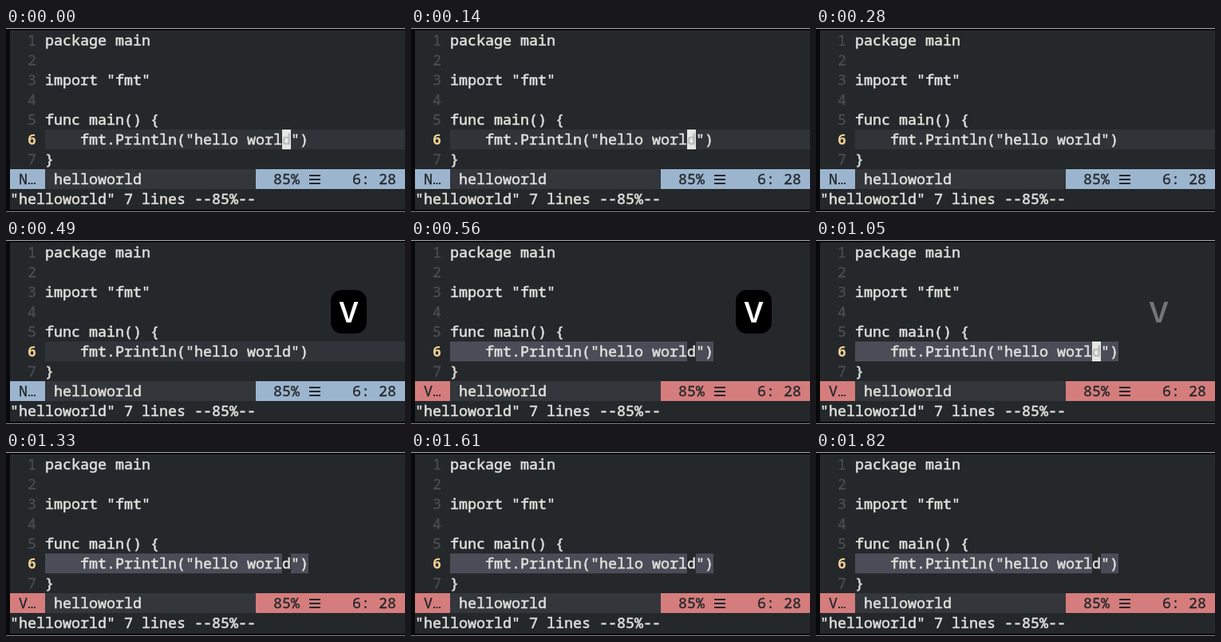
An HTML page that plays this animation: 500x232 px, repeating every 1.89 s.

```html
<!DOCTYPE html>
<html lang="en">
<head>
<meta charset="utf-8">
<title>Editor: selecting a line</title>
<style>
  html, body { margin: 0; width: 100%; height: 100%; overflow: hidden; background: #0b0c0d; }
  svg { display: block; width: 500px; height: 232px; }
  text {
    font: 500 18.333px "Noto Sans Mono", "DejaVu Sans Mono", monospace;
    fill: #e0e0dc; stroke: #e0e0dc; stroke-width: .55px; white-space: pre;
  }
  .nums text { fill: #4b4e51; stroke: #4b4e51; stroke-width: .3px; }
  .nums .current { fill: #f0d090; stroke: none; font-weight: 700; }
  .bar text { fill: #24282b; stroke: #24282b; stroke-width: .35px; }
  .bar .ink { fill: #24282b; }
  .cursor text { fill: #b6b9ba; stroke: #b6b9ba; }

  .normal, .visual, .mode, .cursor, .key, .keybox { animation: 1890ms step-end infinite; }
  .normal { animation-name: normal; }
  .visual { animation-name: visual; }
  .mode { animation-name: mode; }
  .cursor { animation-name: blink; }
  .key { animation-name: key; }
  .keybox { animation-name: keybox; }

  .key { font: 600 35px Inter, Roboto, sans-serif; fill: #fff; stroke: none; }

  @keyframes normal { 0% { opacity: 1 } 29.629%, 100% { opacity: 0 } }
  @keyframes visual { 0% { opacity: 0 } 29.629%, 100% { opacity: 1 } }
  @keyframes mode { 0% { fill: #9cb5ce } 29.629%, 100% { fill: #d57d7d } }
  @keyframes blink {
    0% { opacity: 1 }
    14.814% { opacity: 0 }
    40.74% { opacity: 1 }
    70.37%, 100% { opacity: 0 }
  }
  @keyframes key {
    0% { opacity: 0 }
    25.925% { opacity: 1 }
    51.851% { opacity: .75 }
    55.555% { opacity: .36 }
    59.259%, 100% { opacity: 0 }
  }
  @keyframes keybox {
    0% { opacity: 0 }
    25.925% { opacity: 1 }
    51.851% { opacity: .6 }
    55.555%, 100% { opacity: 0 }
  }
</style>
</head>
<body>
<svg viewBox="0 0 500 232">
  <!-- window edges -->
  <rect width="500" height="232" fill="#08090a"/>
  <rect width="500" height="1" fill="#a9aaa8"/>
  <rect y="231" width="500" height="1" fill="#80817c"/>
  <rect x="5" y="3" width="495" height="226" fill="#24282b"/>

  <!-- current line and selection -->
  <rect class="normal" x="49" y="128" width="451" height="25" fill="#303338"/>
  <g class="visual">
    <rect x="49" y="128" width="330" height="25" fill="#4a4d57"/>
    <rect x="346" y="128" width="11" height="25" fill="#24282b"/>
  </g>

  <g class="nums">
    <text x="27" y="22">1</text>
    <text x="27" y="47">2</text>
    <text x="27" y="72">3</text>
    <text x="27" y="97">4</text>
    <text x="27" y="122">5</text>
    <text x="27" y="147" class="current">6</text>
    <text x="27" y="172">7</text>
  </g>

  <text x="49" y="22">package main</text>
  <text x="49" y="72">import "fmt"</text>
  <text x="49" y="122">func main() {</text>
  <text x="93" y="147">fmt.Println("hello world")</text>
  <text x="49" y="172">}</text>

  <g class="cursor">
    <rect x="346" y="128" width="11" height="25" fill="#e6e6e3"/>
    <text x="346" y="147">d</text>
  </g>

  <!-- status line -->
  <rect x="49" y="178" width="264" height="25" fill="#33363b"/>
  <text x="60" y="197">helloworld</text>
  <g class="bar">
    <path class="mode" d="M5 178h44v25H5zM313 178h187v25H313z"/>
    <text class="normal" x="16" y="197">N</text>
    <text class="visual" x="16" y="197">V</text>
    <path class="ink" d="M28 195h2v2h-2zM31.5 195h2v2h-2zM35 195h2v2h-2z"/>
    <text x="335" y="197">85%</text>
    <path class="ink" d="M380 185h14v2h-14zM380 190h14v2h-14zM380 195h14v2h-14z"/>
    <text x="434" y="197">6: 28</text>
  </g>

  <text x="5" y="222">"helloworld" 7 lines --85%--</text>

  <!-- pressed key -->
  <rect class="keybox" x="407" y="63" width="45" height="55" rx="14" fill="#000"/>
  <text class="key" x="429.5" y="104" text-anchor="middle">V</text>
</svg>
</body>
</html>
```
